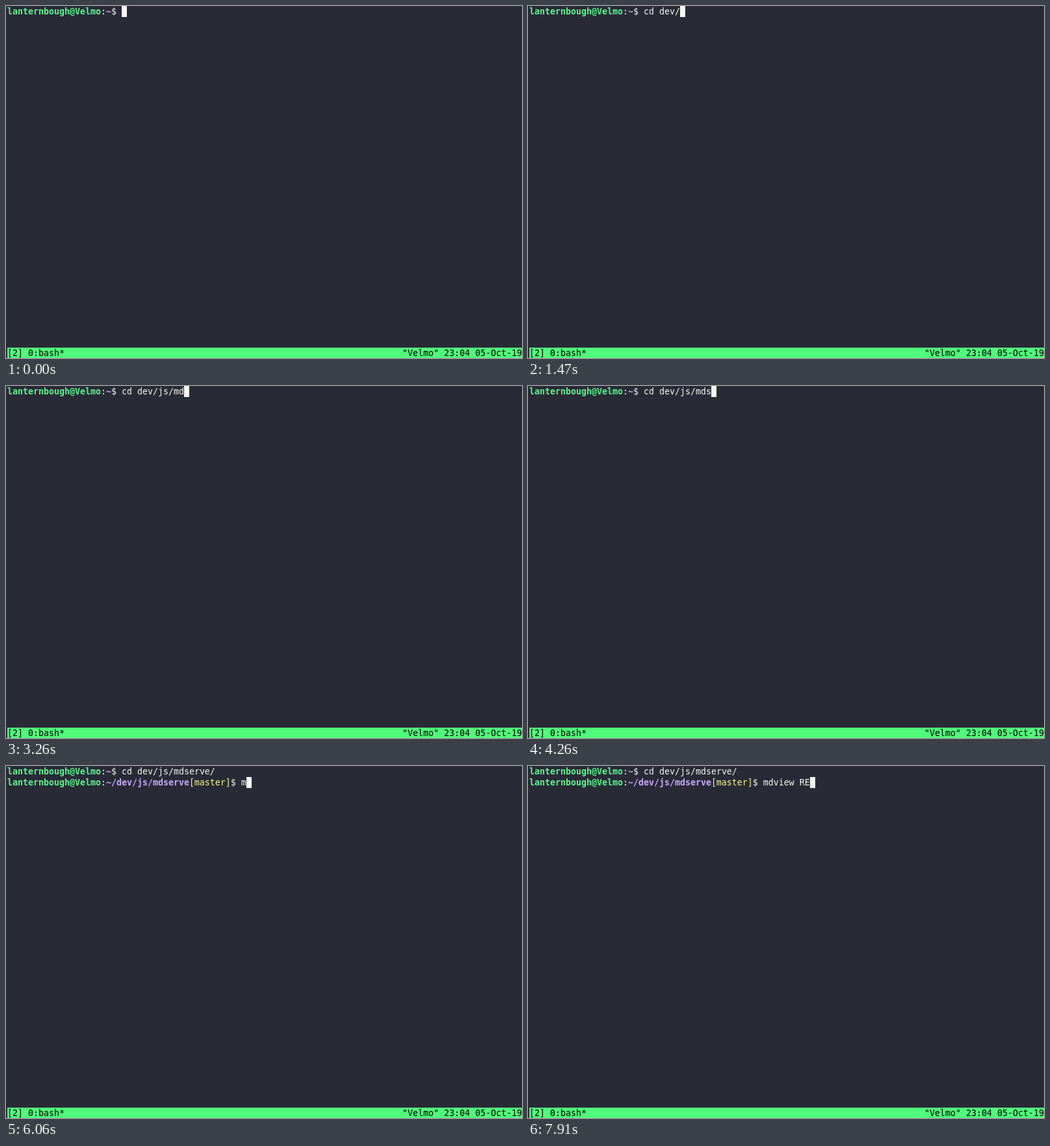
These frames come from a looping animation (794x543 px, 8000 ms). An HTML page:

```html
<!DOCTYPE html>
<html lang="en">
<head>
<meta charset="utf-8">
<title>Terminal</title>
<style>
html, body { margin: 0; width: 100%; height: 100%; overflow: hidden; background: #282a36; }
#term {
  position: relative; width: 794px; height: 543px; overflow: hidden;
  background: #282a36; color: #f8f8f2;
  font: 13.29px/17px "DejaVu Sans Mono", monospace;
  font-variant-ligatures: none;
}
.row { position: absolute; left: 2px; height: 17px; white-space: pre; }
#row1 { top: 17px; }
#status { top: 527px; width: 792px; background: #50fa7b; color: #000; }
#clock { position: absolute; left: 608px; top: 0; }
#cursor { position: absolute; left: 0; top: 0; width: 8px; height: 17px; background: #f8f8f2; }
.user { color: #5af78e; font-weight: bold; }
.path { color: #caa9fa; font-weight: bold; }
.branch { color: #f1fa8c; }
</style>
</head>
<body>
<div id="term">
  <div class="row" id="row0"><span class="user">lanternbough@Velmo</span>:<span class="path">~</span>$ <span id="cmd0"></span></div>
  <div class="row" id="row1"><span class="user">lanternbough@Velmo</span>:<span class="path">~/dev/js/mdserve</span><span class="branch">[master]</span>$ <span id="cmd1"></span></div>
  <div class="row" id="status">[2] 0:bash*<span id="clock">"Velmo" 23:04 05-Oct-19</span></div>
  <div id="cursor"></div>
</div>
<script>
const LOOP = 8000, CELL = 8, LINE = 17, LEFT = 2;
const ENTER = 5000, PROMPT = 5060;

// Each step: time in ms, number of characters typed so far
const lines = [
  { text: "cd dev/js/mdserve/", col: 22, steps: [
    [500, 1], [560, 2], [740, 3], [830, 4], [920, 5], [1100, 6], [1470, 7],
    [2090, 8], [2150, 9], [2520, 10], [3080, 11], [3260, 12], [4260, 13], [4440, 18]] },
  { text: "mdview RE", col: 45, steps: [
    [6060, 1], [6180, 2], [6360, 3], [6540, 7], [7850, 8], [7910, 9]] }
];

const el = id => document.getElementById(id);
const cmds = [el("cmd0"), el("cmd1")];
const row1 = el("row1"), cursor = el("cursor");

function typed(line, t) {
  let n = 0;
  for (const [at, count] of line.steps) if (t >= at) n = count;
  return n;
}

function draw(t) {
  const counts = lines.map(line => typed(line, t));
  cmds.forEach((cmd, i) => {
    const text = lines[i].text.slice(0, counts[i]);
    if (cmd.textContent !== text) cmd.textContent = text;
  });
  row1.style.visibility = t >= PROMPT ? "visible" : "hidden";

  const row = t >= ENTER ? 1 : 0;
  const waiting = t >= ENTER && t < PROMPT;
  const col = waiting ? 0 : lines[row].col + counts[row];
  cursor.style.transform = `translate(${LEFT + col * CELL}px, ${row * LINE}px)`;
}

const start = performance.now();
function tick() {
  draw((performance.now() - start) % LOOP);
  requestAnimationFrame(tick);
}
tick();
</script>
</body>
</html>
```
